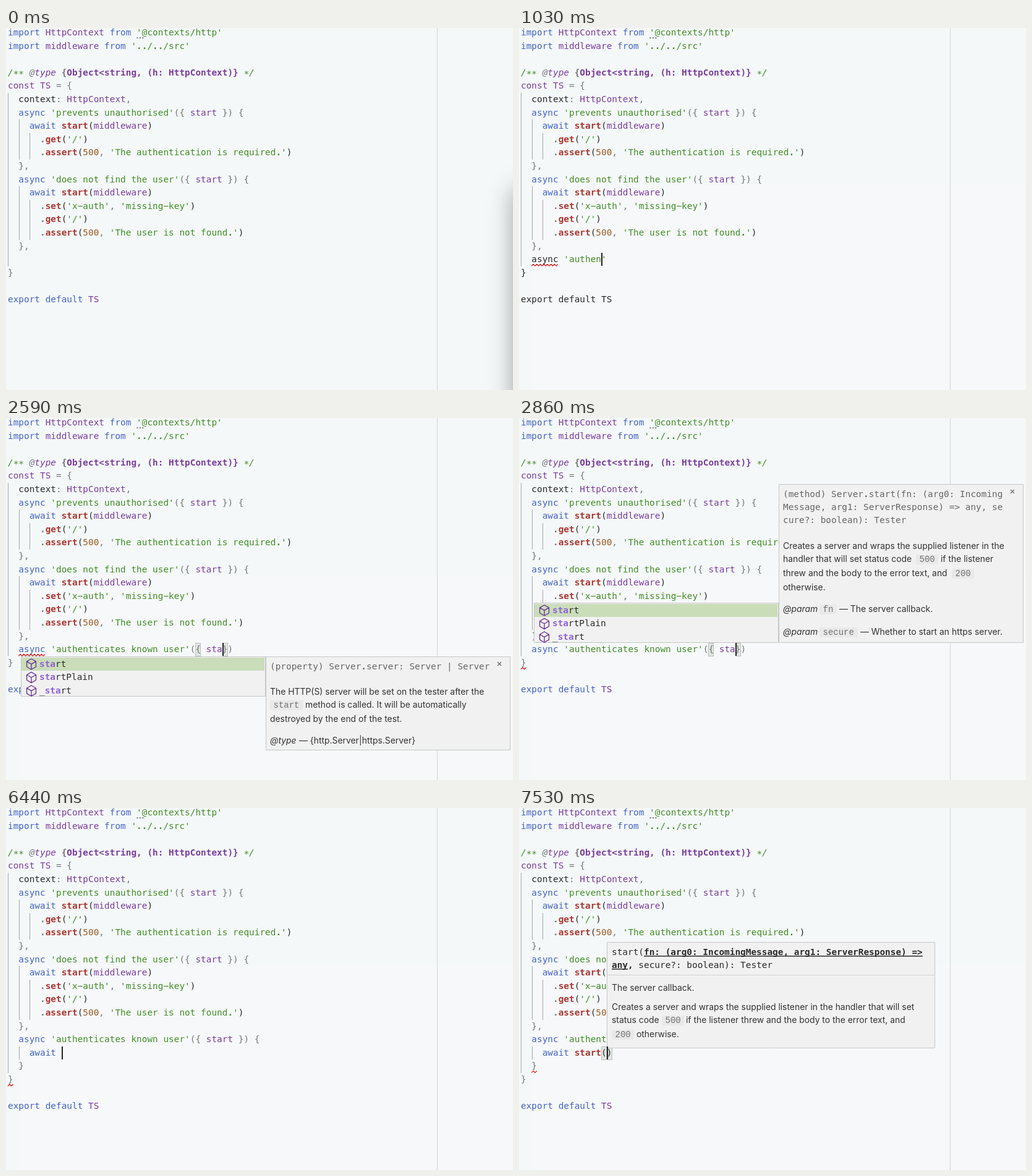
Write an HTML page with a canvas that moves like this. It is 820 by 586 pixels and loops after 8000 ms.

```html
<!DOCTYPE html>
<html lang="en">
<head>
<meta charset="utf-8">
<title>Typing a test</title>
<style>
html, body { margin: 0; width: 100%; height: 100%; overflow: hidden; background: #f4f8f9; }
canvas { display: block; width: 820px; height: 586px; }
</style>
</head>
<body>
<canvas id="stage" width="820" height="586"></canvas>
<script>
const ctx = document.getElementById('stage').getContext('2d');
const W = 820, H = 586, LOOP = 8000;
const SIZE = 14.4, CHAR = SIZE * 0.602, ROW = 21.6, LEFT = 3, TOP = -3;
const MONO = '"DejaVu Sans Mono", monospace';
const CODE = '"Liberation Mono", monospace';
const SANS = 'Inter, sans-serif';

const colX = c => LEFT + c * CHAR;
const rowY = r => TOP + r * ROW;

// Style letter -> colour and font variant
const STYLES = {
  d: ['#2b2b2b', ''],
  g: ['#777777', ''],
  G: ['#777777', 'bold '],
  k: ['#4463c4', ''],
  p: ['#7a3e9d', ''],
  P: ['#7a3e9d', 'bold '],
  i: ['#7a3e9d', 'italic '],
  j: ['#777777', 'italic '],
  s: ['#448c27', ''],
  c: ['#448c27', 'italic '],
  f: ['#aa3731', 'bold '],
  n: ['#9c5d27', ''],
  D: ['#2b2b2b', 'bold '],
  v: ['#9063d6', 'bold '],
  m: ['#666666', '']
};
const GLYPHS = { '-': '\u2212', '*': '\u2217' };

// Head of the file: "~x" switches to style x
const HEAD = [
  "~kimport ~pHttpContext ~kfrom ~s'@contexts/http'",
  "~kimport ~pmiddleware ~kfrom ~s'../../src'",
  "",
  "~c/** ~j@~itype ~G{~PObject<string, (h: HttpContext)}~c */",
  "~pconst TS ~g= {",
  "~d  context~g: ~pHttpContext~g,",
  "~k  async ~s'prevents unauthorised'~g({ ~pstart ~g}) {",
  "~k    await ~fstart~d(~pmiddleware~d)",
  "~G      .~fget~d(~s'/'~d)",
  "~G      .~fassert~d(~n500~g, ~s'The authentication is required.'~d)",
  "~g  },",
  "~k  async ~s'does not find the user'~g({ ~pstart ~g}) {",
  "~k    await ~fstart~d(~pmiddleware~d)",
  "~G      .~fset~d(~s'x-auth'~g, ~s'missing-key'~d)",
  "~G      .~fget~d(~s'/'~d)",
  "~G      .~fassert~d(~n500~g, ~s'The user is not found.'~d)",
  "~g  },"
];

// Typing states: time, line with "|" for the caret, highlighted brackets, following line
const TITLE = 'authenticates known user';
const OPEN = `~k  async ~s'${TITLE}'`;
const DONE = OPEN + '~g({ ~pstart ~g}) {';
const steps = [[0, ''], [500, '~d  async |']];
const typeTitle = (at, n) => steps.push([at, `~d  async ~s'${TITLE.slice(0, n)}|'`]);
typeTitle(1030, 6);
[8, 10, 12, 14, 16, 19].forEach((n, i) => typeTitle(1210 + i * 100, n));
typeTitle(1860, 21);
typeTitle(1980, 24);
steps.push(
  [2100, `~d  async ~s'${TITLE}'|`],
  [2280, OPEN + '~g(|)', [34, 35]],
  [2383, OPEN + '~g({|})', [35, 36]],
  [2487, OPEN + '~g({ ~ps|~g})', [35, 38]],
  [2590, OPEN + '~g({ ~psta|~g})', [35, 40]],
  [5190, OPEN + '~g({ ~pstart |~g})', [35, 43]],
  [5400, OPEN + '~g({ ~pstart ~g}) |'],
  [5550, OPEN + '~g({ ~pstart ~g}) {|}', [46, 47]],
  [5780, DONE, [], '~d    a|'],
  [5930, DONE, [], '~d    awa|'],
  [6140, DONE, [], '~d    awai|'],
  [6230, DONE, [], '~k    await|'],
  [6440, DONE, [], '~k    await |']
);
for (let n = 1; n <= 5; n++) {
  steps.push([6440 + n * 102, DONE, [], `~k    await ~p${'start'.slice(0, n)}|`]);
}
steps.push([7530, DONE, [15, 16], '~k    await ~fstart~d(|)']);

function rect(x, y, w, h, fill) {
  ctx.fillStyle = fill;
  ctx.fillRect(x, y, w, h);
}

function box(x, y, w, h, fill, stroke) {
  rect(x, y, w, h, fill);
  ctx.strokeStyle = stroke;
  ctx.lineWidth = 1;
  ctx.strokeRect(x + 0.5, y + 0.5, w - 1, h - 1);
}

// Draws marked-up monospace text; returns the caret column or -1
function mono(markup, x, base) {
  let col = 0, caret = -1;
  for (const part of markup.split('~').slice(1)) {
    const [color, variant] = STYLES[part[0]];
    ctx.fillStyle = color;
    for (const ch of part.slice(1)) {
      if (ch === '|' && x === LEFT) { caret = col; continue; }
      ctx.font = (ch === '.' ? 'bold ' : variant) + SIZE + 'px ' + MONO;
      ctx.fillText(GLYPHS[ch] || ch, x + col * CHAR, base);
      col++;
    }
  }
  return caret;
}

const codeLine = (markup, row) => mono(markup, LEFT, Math.floor(rowY(row) + 15.4));

function prose(text, x, base, style = '') {
  ctx.font = style + '13.9px ' + SANS;
  ctx.fillStyle = '#333333';
  ctx.fillText(text, x, base);
}

function chip(text, x, base) {
  ctx.fillStyle = '#e9e9e9';
  ctx.beginPath();
  ctx.roundRect(x, base - 12, text.length * SIZE * 0.6 + 10, 16, 2);
  ctx.fill();
  ctx.font = '14px ' + CODE;
  ctx.fillStyle = '#707070';
  ctx.fillText(text, x + 5.5, base);
}

function squiggle(col, row, len) {
  const x = colX(col), end = colX(col + len), y = rowY(row + 1) - 2;
  ctx.strokeStyle = '#dd1111';
  ctx.lineWidth = 1.2;
  ctx.beginPath();
  for (let i = 0; x + i * 2.85 <= end; i++) ctx.lineTo(x + i * 2.85, y + (i % 2 ? -1.4 : 1.4));
  ctx.stroke();
}

function guide(col, from, to) {
  const y = Math.round(rowY(from));
  rect(Math.round(colX(col) + 0.3), y, 1, Math.round(rowY(to)) - y, '#a3a6a7');
}

function cube(x, y) {
  const at = i => [x + 8.6 * Math.sin(i * Math.PI / 3), y - 8.6 * Math.cos(i * Math.PI / 3)];
  ctx.strokeStyle = '#6a2c91';
  ctx.lineWidth = 1.3;
  ctx.lineJoin = 'round';
  ctx.beginPath();
  for (let i = 0; i < 6; i++) ctx.lineTo(...at(i));
  ctx.closePath();
  for (const i of [1, 3, 5]) {
    ctx.moveTo(x, y);
    ctx.lineTo(...at(i));
  }
  ctx.stroke();
}

function suggestions(y) {
  box(24, y, 396, 65, '#f1f1f1', '#c6c6c6');
  rect(25, y + 2, 393, 21, '#c9ddb9');
  ['~vsta~drt', '~vsta~drtPlain', '~d_~vsta~drt'].forEach((item, i) => {
    const mid = y + 11.6 + i * ROW;
    cube(41, mid + 0.8);
    mono(item, 54, mid + 5);
  });
}

function panel(y, h) {
  box(420, y, 396, h, '#f1f1f1', '#c6c6c6');
  ctx.strokeStyle = '#777777';
  ctx.lineWidth = 1.6;
  ctx.beginPath();
  for (const s of [-1, 1]) {
    ctx.moveTo(795, y + 12 - 3 * s);
    ctx.lineTo(801, y + 12 + 3 * s);
  }
  ctx.stroke();
}

function propertyHelp() {
  suggestions(386);
  panel(386, 152);
  mono('~m(property) Server.server: Server | Server', 427, 407);
  prose('The HTTP(S) server will be set on the tester after the', 427, 448);
  chip('start', 427, 469);
  prose('method is called. It will be automatically', 484, 469);
  prose('destroyed by the end of the test.', 427, 492);
  prose('@type', 427, 527, 'italic ');
  prose('— {http.Server|https.Server}', 474, 527);
}

function methodHelp() {
  suggestions(299);
  panel(107, 257);
  mono('~m(method) Server.start(fn: (arg0: Incoming', 427, 128);
  mono('~mMessage, arg1: ServerResponse) => any, se', 427, 149);
  mono('~mcure?: boolean): Tester', 427, 170);
  prose('Creates a server and wraps the supplied listener in the', 427, 212);
  prose('handler that will set status code', 427, 233);
  chip('500', 642, 233);
  prose('if the listener', 682, 233);
  prose('threw and the body to the error text, and', 427, 256);
  chip('200', 700, 256);
  prose('otherwise.', 427, 279);
  prose('@param', 427, 314, 'italic ');
  chip('fn', 486, 314);
  prose('— The server callback.', 518, 314);
  prose('@param', 427, 351, 'italic ');
  chip('secure', 486, 351);
  prose('— Whether to start an https server.', 552, 351);
}

function signatureHelp() {
  box(142, 217, 531, 172, '#f1f1f1', '#c6c6c6');
  rect(143, 270, 529, 1, '#d2d2d2');
  mono('~dstart(~Dfn: (arg0: IncomingMessage, arg1: ServerResponse) =>', 150, 238);
  mono('~Dany,~d secure?: boolean): Tester', 150, 259);
  rect(150 + 6 * CHAR, 239, 52 * CHAR, 1.5, '#2b2b2b');
  rect(150, 260, 3 * CHAR, 1.5, '#2b2b2b');
  prose('The server callback.', 150, 296);
  prose('Creates a server and wraps the supplied listener in the handler that will set', 150, 327);
  prose('status code', 150, 348);
  chip('500', 231, 348);
  prose('if the listener threw and the body to the error text, and', 270, 348);
  chip('200', 150, 371);
  prose('otherwise.', 190, 371);
}

function backdrop(t) {
  rect(0, 0, W, H, '#f4f8f9');
  if (t >= 500) rect(21, 254, W - 21, H - 254, '#f6f8fa');
  rect(697, 0, 1, H, '#d0d4d5');
  if (t < 500) {
    ctx.save();
    ctx.shadowColor = 'rgba(0,0,0,0.38)';
    ctx.shadowBlur = 40;
    ctx.beginPath();
    ctx.roundRect(822, 260, 200, 500, 10);
    ctx.fill();
    ctx.restore();
  }
}

function draw(t) {
  const [, line, marks = [], next] = steps.findLast(s => s[0] <= t);
  const last = next ? 20 : 18;
  const broken = t >= 1030 && t < 2280;

  backdrop(t);
  guide(0, 5, last);
  for (const [from, to] of [[7, 10], [12, 16]]) {
    guide(2, from, to);
    guide(4, from + 1, to);
  }
  if (next) guide(2, 18, 19);

  const typedY = Math.round(rowY(next ? 18 : 17));
  for (const c of marks) {
    box(Math.round(colX(c)), typedY, 9, 22, '#e1e7e2', '#b9beba');
  }

  HEAD.forEach(codeLine);
  for (let i = 0; i < 3; i++) rect(211.5 + i * 4.4, 15, 2, 2, '#777777');

  let caret = codeLine(line, 17);
  if (next) {
    caret = codeLine(next, 18);
    codeLine('~g  }', 19);
  }
  codeLine(broken ? '~d}' : '~g}', last);
  codeLine(broken ? '~dexport default TS' : '~kexport default ~pTS', last + 2);

  if (t >= 7050) squiggle(2, 19, 1);
  else if (t >= 2860) squiggle(0, last, 1);
  else if (t >= 1030) squiggle(2, 17, 5);

  if (t >= 2590 && t < 2710) propertyHelp();
  else if (t >= 2710 && t < 5190) methodHelp();
  else if (t >= 7530) signatureHelp();

  if (caret >= 0) rect(Math.round(colX(caret)), typedY, 2, 21, '#222222');
}

const start = performance.now();
function tick() {
  draw((performance.now() - start) % LOOP);
  requestAnimationFrame(tick);
}
tick();
</script>
</body>
</html>
```
